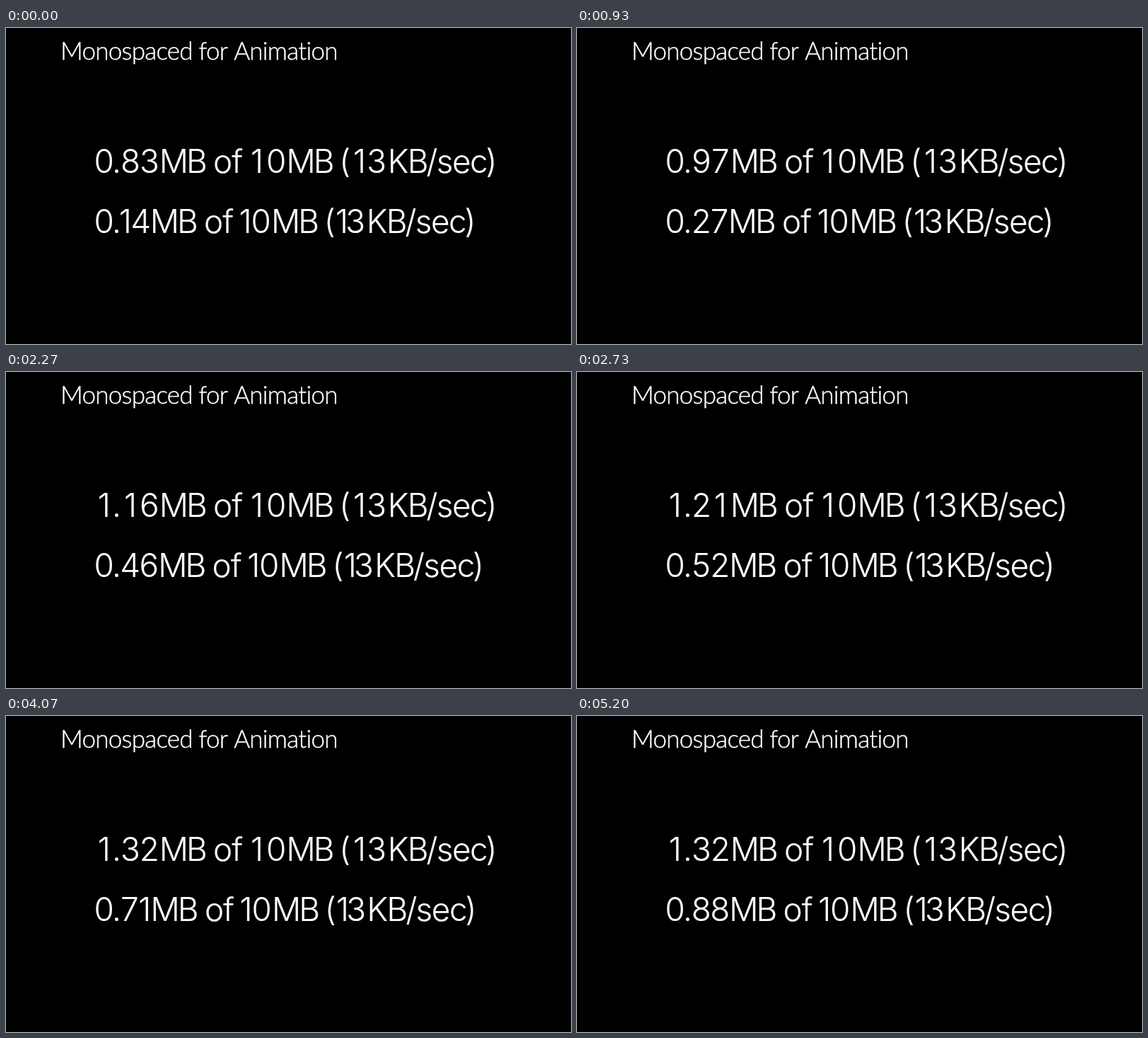
Animation of 799 by 447 pixels, one loop 5.27 s. Source, as an HTML page with a canvas:

```html
<!DOCTYPE html>
<html lang="en">
<head>
<meta charset="utf-8">
<title>Monospaced for Animation</title>
<style>
html, body { margin: 0; width: 100%; height: 100%; overflow: hidden; background: #000; }
canvas { display: block; }
</style>
</head>
<body>
<canvas id="stage" width="799" height="447"></canvas>
<script>
const ctx = document.getElementById('stage').getContext('2d');
const LOOP = 5270, TICKS = 79;
const BODY = '300 45.8px Inter, "Open Sans", sans-serif';
const TITLE = '300 35px Lato, "Open Sans", sans-serif';

// Places text by the left edge of its ink.
function word(text, left, y, tracking = 0) {
  ctx.letterSpacing = tracking + 'px';
  ctx.textAlign = 'left';
  const x = left + ctx.measureText(text).actualBoundingBoxLeft;
  ctx.fillText(text, x, y);
  ctx.strokeText(text, x, y);
}

function glyph(ch, center, y) {
  ctx.letterSpacing = '0px';
  ctx.textAlign = 'center';
  ctx.fillText(ch, center, y);
  ctx.strokeText(ch, center, y);
}

// Text after the counter; one is the width lost by each narrow "1".
function tail(y, dx, one) {
  word('MB', 220.7 + dx, y, -3);
  word('of', 295 + dx, y, -1);
  word('1', 348 + dx - one * 0.4, y);
  dx -= one;
  word('0', 370 + dx, y);
  word('MB', 400.5 + dx, y, -3);
  word('(', 476.3 + dx, y);
  word('1', 493 + dx - one * 0.4, y);
  dx -= one;
  word('3', 513.3 + dx, y);
  word('KB', 543.7 + dx, y, -1.7);
  word('/', 595.5 + dx, y);
  word('sec', 610.7 + dx, y, -1.4);
  word(')', 680.5 + dx, y);
}

function tabular(value, y) {
  const [a, b, c] = String(value).padStart(3, '0');
  glyph(a, 138.7, y);
  glyph('.', 156.5, y);
  glyph(b, 176, y);
  glyph(c, 202.8, y);
  tail(y, 0, 0);
}

const advance = d => d === '1' ? 17.5 : d === '7' ? 25 : 26.6;

function proportional(value, y) {
  const [a, b, c] = String(value).padStart(3, '0');
  glyph(a, 138.7, y);
  glyph('.', 156.5, y);
  let x = 162.4 - (b === '1' ? 2.5 : 0);
  for (const d of [b, c]) {
    glyph(d, x + advance(d) / 2, y);
    x += advance(d);
  }
  tail(y, x - 217, 8.5);
}

function draw(time) {
  const tick = Math.floor((time % LOOP + 4) / LOOP * TICKS);
  const steps = tick * 0.945;
  ctx.fillStyle = '#000';
  ctx.fillRect(0, 0, 799, 447);
  ctx.fillStyle = ctx.strokeStyle = '#fff';
  ctx.font = TITLE;
  ctx.lineWidth = 0.45;
  word('Monospaced for Animation', 80, 44.7, -0.75);
  ctx.font = BODY;
  ctx.lineWidth = 0.2;
  tabular(Math.min(132, Math.floor(83 + steps + 0.9)), 204.5);
  proportional(Math.floor(14 + steps + 0.32), 290);
}

const start = performance.now();
function frame() {
  draw(performance.now() - start);
  requestAnimationFrame(frame);
}
frame();
</script>
</body>
</html>
```
